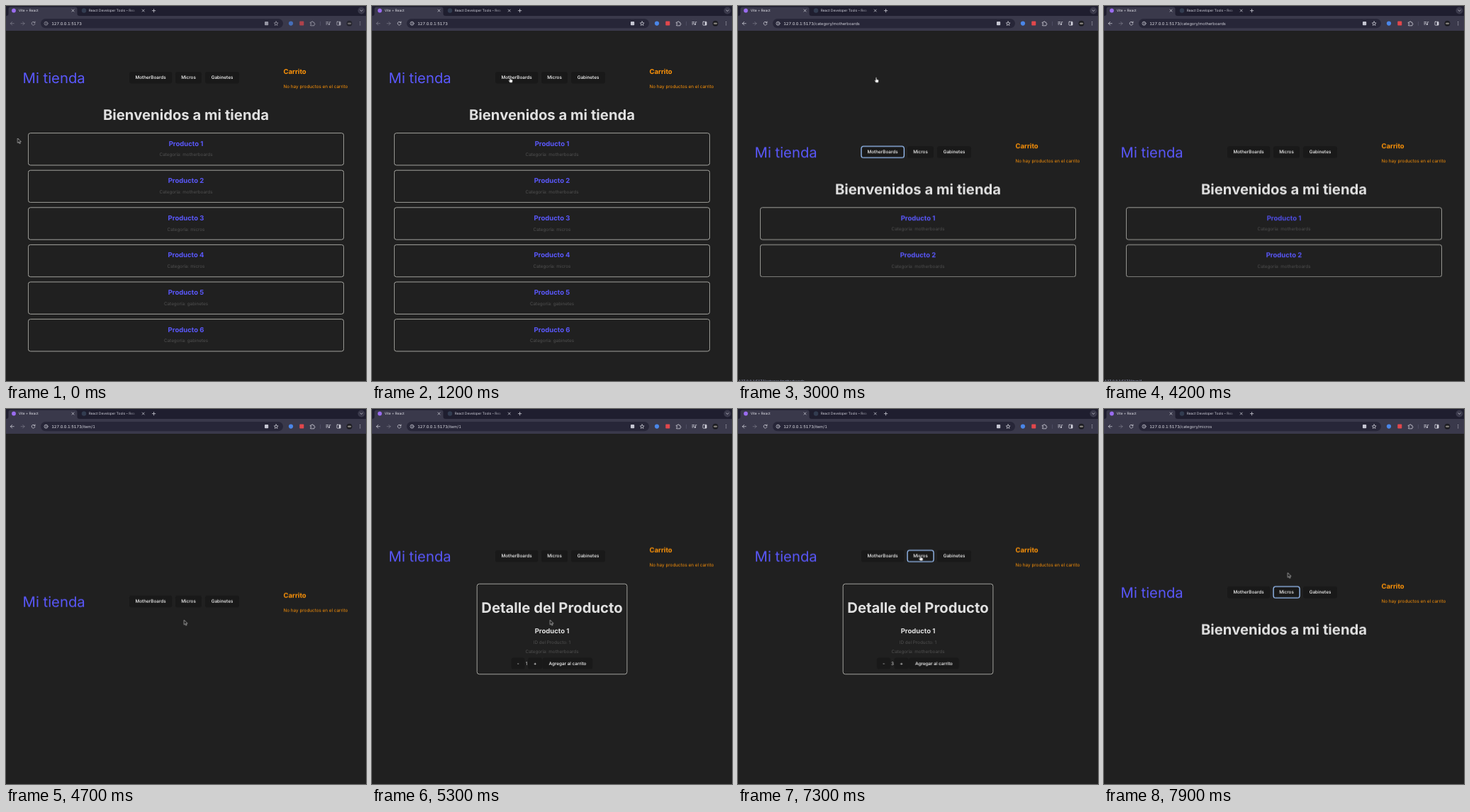
These frames come from a looping animation (508 by 530 pixels, 8 s). An HTML page:

```html
<!DOCTYPE html>
<html lang="es">
<head>
<meta charset="utf-8">
<title>Mi tienda</title>
<style>
html, body { margin: 0; width: 100%; height: 100%; overflow: hidden; background: #202020; }
svg { display: block; }
text { font-family: Inter, "Noto Sans", sans-serif; font-size: 6.35px; text-rendering: geometricPrecision; }
.mid { text-anchor: middle; }
.h1 { font-size: 20.3px; font-weight: 700; fill: #e0e0e0; }
.h2 { font-size: 9.525px; font-weight: 700; }
.brand { font-size: 20.3px; fill: #5a58fb; }
.link { fill: #5a58fb; }
.dim { fill: #505050; }
.cart { fill: #ff9408; }
.btn rect { fill: #191919; }
.btn text { fill: #fff; font-weight: 500; text-anchor: middle; }
.card { fill: none; stroke: #c4c4be; stroke-width: .8; }
.ring { fill: none; stroke: #9cc3fb; stroke-width: 1.3; }
.tab { font-size: 4.85px; fill: #e3e3ea; }
.url { font-size: 5.65px; fill: #e8e8ee; font-variant-numeric: tabular-nums; }
.url tspan { fill: #cfcfd8; }
.status { font-size: 4.85px; fill: #b4bae0; font-variant-numeric: tabular-nums; }
.line { fill: none; stroke: #d3d3dd; stroke-width: .75; stroke-linecap: round; stroke-linejoin: round; }

/* one loop is 8 s, so 1.25% is 100 ms */
.a { animation: 8s step-end infinite; }
.tools { animation-name: tools; }
.back { animation-name: back; }
.page { animation-name: page; }
.welcome { animation-name: welcome; }
.rest { animation-name: rest; }
.detail { animation-name: detail; }
.ring-mb { animation-name: ring-mb; }
.ring-mi { animation-name: ring-mi; }
.ring-plus { animation-name: ring-plus; }
.hover { animation-name: hover; }
.u-home { animation-name: u-home; }
.u-mb { animation-name: u-mb; }
.u-item { animation-name: u-item; }
.u-mi { animation-name: u-mi; }
.s-mb { animation-name: s-mb; }
.s-item { animation-name: s-item; }
.one { animation-name: one; }
.two { animation-name: two; }
.three { animation-name: three; }
.less { animation-name: less; }
.more { animation-name: more; }
.cursor { animation-name: cursor; }
.arrow { animation-name: arrow; }
.hand { animation-name: hand; }

@keyframes tools { 0% { opacity: .7 } 15%, 100% { opacity: 1 } }
@keyframes back { 0% { opacity: .45 } 23.75%, 100% { opacity: 1 } }
@keyframes page {
  0% { transform: translateY(0) }
  37.5% { transform: translateY(105.2px) }
  53.75% { transform: translateY(170.7px) }
  66.25% { transform: translateY(106.6px) }
  92.5%, 100% { transform: translateY(157.8px) }
}
@keyframes welcome { 0% { opacity: 1 } 53.75% { opacity: 0 } 92.5%, 100% { opacity: 1 } }
@keyframes rest { 0% { opacity: 1 } 37.5%, 100% { opacity: 0 } }
@keyframes detail { 0% { opacity: 0 } 66.25% { opacity: 1 } 92.5%, 100% { opacity: 0 } }
@keyframes ring-mb {
  0% { opacity: 0 } 18.75% { opacity: .4 } 20% { opacity: .75 } 21.25% { opacity: 1 } 51.25%, 100% { opacity: 0 }
}
@keyframes ring-mi { 0% { opacity: 0 } 90%, 100% { opacity: 1 } }
@keyframes ring-plus { 0% { opacity: 0 } 77.5% { opacity: 1 } 90%, 100% { opacity: 0 } }
@keyframes hover { 0% { fill: #5a58fb } 47.5% { fill: #504ee6 } 53.75%, 100% { fill: #5a58fb } }
@keyframes u-home { 0% { opacity: 1 } 23.75%, 100% { opacity: 0 } }
@keyframes u-mb { 0% { opacity: 0 } 23.75% { opacity: 1 } 53.75%, 100% { opacity: 0 } }
@keyframes u-item { 0% { opacity: 0 } 53.75% { opacity: 1 } 92.5%, 100% { opacity: 0 } }
@keyframes u-mi { 0% { opacity: 0 } 92.5%, 100% { opacity: 1 } }
@keyframes s-mb { 0% { opacity: 0 } 23.75% { opacity: .5 } 25% { opacity: 1 } 46.25%, 100% { opacity: 0 } }
@keyframes s-item { 0% { opacity: 0 } 48.75% { opacity: 1 } 57.5% { opacity: .5 } 58.75%, 100% { opacity: 0 } }
@keyframes one { 0% { opacity: 1 } 77.5%, 100% { opacity: 0 } }
@keyframes two { 0% { opacity: 0 } 77.5% { opacity: 1 } 81.25%, 100% { opacity: 0 } }
@keyframes three { 0% { opacity: 0 } 81.25%, 100% { opacity: 1 } }
@keyframes less { 0% { transform: none } 77.5%, 100% { transform: translateX(-.5px) } }
@keyframes more { 0% { transform: none } 77.5%, 100% { transform: translateX(.5px) } }
@keyframes cursor {
  0% { transform: translate(16.5px, 187px) }
  1.25% { transform: translate(18.7px, 186px) }
  3.75% { transform: translate(153.5px, 112.5px) }
  6.25% { transform: translate(165px, 110px); animation-timing-function: steps(3) }
  10% { transform: translate(206px, 102.5px); animation-timing-function: steps(2) }
  12.5% { transform: translate(195px, 100.7px) }
  41.25% { transform: translate(203px, 145px); animation-timing-function: steps(2) }
  43.75% { transform: translate(241.5px, 285px) }
  46.25% { transform: translate(245px, 290px); animation-timing-function: steps(3) }
  50% { transform: translate(251.3px, 298.3px) }
  70% { transform: translate(262px, 314px); animation-timing-function: steps(3) }
  73.75% { transform: translate(297px, 358px); animation-timing-function: steps(2) }
  76.25% { transform: translate(232.3px, 359.8px) }
  83.75% { transform: translate(236px, 338px); animation-timing-function: steps(4) }
  88.75% { transform: translate(257.5px, 207px) }
  98.75%, 100% { transform: translate(259.3px, 231.5px) }
}
@keyframes arrow {
  0% { opacity: 1 } 7.5% { opacity: 0 } 41.25% { opacity: 1 } 47.5% { opacity: 0 } 53.75% { opacity: 1 }
  73.75% { opacity: 0 } 83.75% { opacity: 1 } 87.5% { opacity: 0 } 98.75%, 100% { opacity: 1 }
}
@keyframes hand {
  0% { opacity: 0 } 7.5% { opacity: 1 } 41.25% { opacity: 0 } 47.5% { opacity: 1 } 52.5% { opacity: 0 }
  73.75% { opacity: 1 } 83.75% { opacity: 0 } 87.5% { opacity: 1 } 98.75%, 100% { opacity: 0 }
}
</style>
</head>
<body>
<svg width="508" height="530" viewBox="0 0 508 530">
  <defs>
    <linearGradient id="fade" gradientUnits="userSpaceOnUse" x1="172" x2="187" y1="0" y2="0">
      <stop stop-color="#d0d0da"/><stop offset="1" stop-color="#d0d0da" stop-opacity="0"/>
    </linearGradient>
  </defs>
  <rect width="508" height="530" fill="#202020"/>

  <!-- store page -->
  <g class="a page">
    <text class="brand" x="23.6" y="108.8">Mi tienda</text>
    <g class="btn">
      <rect x="174" y="93" width="60.4" height="16.4" rx="3.2"/><text x="204" y="103.3">MotherBoards</text>
      <rect x="239" y="93" width="37" height="16.4" rx="3.2"/><text x="257.5" y="103.3">Micros</text>
      <rect x="281" y="93" width="48" height="16.4" rx="3.2"/><text x="305" y="103.3">Gabinetes</text>
    </g>
    <rect class="ring a ring-mb" x="174" y="93.2" width="60.4" height="15.9" rx="3.2"/>
    <rect class="ring a ring-mi" x="239.1" y="93.2" width="37" height="15.9" rx="3.2"/>
    <text class="h2 cart" x="391.4" y="96.4">Carrito</text>
    <text class="cart" x="391.5" y="116">No hay productos en el carrito</text>
    <g class="a welcome">
      <text class="h1 mid" x="254" y="161">Bienvenidos a mi tienda</text>
      <g class="a rest" id="filtered"><g id="first"></g></g>
    </g>
  </g>

  <!-- product detail -->
  <g class="a detail">
    <rect class="card" x="148.2" y="247.2" width="211.7" height="127.6" rx="3.2"/>
    <text class="h1 mid" x="254" y="287.9">Detalle del Producto</text>
    <text class="h2 mid" x="254" y="317.4" fill="#e0e0e0">Producto 1</text>
    <text class="dim mid" x="254" y="331.9">ID del Producto: 1</text>
    <text class="dim mid" x="254" y="345.3">Categoría: motherboards</text>
    <g class="btn a less"><rect x="196.6" y="351.4" width="19" height="16.2" rx="3.2"/><text x="206.3" y="361.8">-</text></g>
    <g class="btn a more">
      <rect x="220" y="351.4" width="20.2" height="16.2" rx="3.2"/>
      <rect x="240.6" y="351.4" width="70.6" height="16.2" rx="3.2"/>
      <text x="230" y="361.8">+</text><text x="276" y="361.8">Agregar al carrito</text>
      <rect class="ring a ring-plus" style="fill:none" x="220.3" y="351.7" width="20" height="15.6" rx="3.2"/>
    </g>
    <g class="mid" fill="#d8d8d8">
      <text class="a one" x="218" y="361.8">1</text>
      <text class="a two" x="218" y="361.8">2</text>
      <text class="a three" x="218" y="361.8">3</text>
    </g>
  </g>

  <!-- browser frame -->
  <rect width="508" height="15" fill="#1f1e2f"/>
  <path d="M0 14Q3.5 14 3.5 11V4.5Q3.5 1.5 6.5 1.5H97.500Q100.500 1.500 100.500 4.500V11Q100.500 14 104 14H508V35H0Z" fill="#3a394b"/>
  <rect x="49" y="18" width="342" height="13.200" rx="6.600" fill="#272638"/>
  <circle cx="11" cy="6.500" r="2.900" fill="#9a6cf0"/>
  <circle cx="110" cy="6.500" r="3.200" fill="#323c50"/>
  <text class="tab" x="17.700" y="8.300">Vite + React</text>
  <text class="tab" x="116.700" y="8.300" style="fill:url(#fade)">React Developer Tools – Rea</text>
  <path class="line" d="M93 5l3 3m0-3l-3 3M192.200 5l3 3m0-3l-3 3M206.400 6.600h4.400m-2.200-2.200v4.400"/>
  <circle cx="501.500" cy="6.500" r="5" fill="#3a394b"/>
  <path class="line" d="M499.900 5.800l1.600 1.500 1.600-1.500"/>
  <path class="line a back" d="M11.200 24.700H6.300m2.300-2.300l-2.300 2.300 2.300 2.300"/>
  <path class="line" opacity=".4" d="M21.100 24.700h4.900m-2.300-2.300l2.300 2.300-2.300 2.300"/>

  <g class="a tools">
    <path class="line" d="M40.700 23.500a2.400 2.400 0 1 0 .2 1.800M41 22v1.700h-1.700"/>
    <circle class="line" cx="56.500" cy="24.700" r="2.500"/>
    <path class="line" d="M56.500 24.600v1.200m0-2.500v.1"/>
    <rect x="365" y="22" width="5.200" height="5.200" rx=".8" fill="#c5c6d2"/>
    <path class="line" d="M381.200 21.900l.8 1.900 2.100.2-1.600 1.400.5 2-1.800-1.100-1.800 1.100.5-2-1.600-1.400 2.100-.2z"/>
    <circle cx="402" cy="24.600" r="3.100" fill="#4a86e8"/>
    <rect x="414.300" y="21.600" width="6" height="6" rx=".8" fill="#e2474c"/>
    <path class="line" d="M429.700 23h1.600q0-1.300 1-1.300t1 1.300h1.500v1.500q1.200 0 1.200 1t-1.200 1v1.300h-5.100v-1.600q1.200-.1 1.200-.9t-1.200-.9z"/>
    <path class="line" d="M451.800 22.600h3m-3 1.700h3m-3 1.700h1.600m3.200-.2v-3.200h1.300"/>
    <circle cx="455.800" cy="26" r="1" fill="#d3d3dd"/>
    <rect class="line" x="466.900" y="22.200" width="5.200" height="5" rx=".6"/>
    <rect x="469.800" y="22.400" width="2.200" height="4.600" fill="#d3d3dd"/>
    <circle cx="484.500" cy="24.700" r="3.900" fill="#1d1d22"/>
    <ellipse cx="484.600" cy="24.700" rx="2.700" ry="1.200" fill="#85817c"/>
    <g fill="#d3d3dd">
      <circle cx="499.700" cy="22.600" r=".55"/><circle cx="499.700" cy="24.700" r=".55"/><circle cx="499.700" cy="26.800" r=".55"/>
    </g>
  </g>
  <path d="M443.500 21.800v6" stroke="#56556a" stroke-width=".7"/>
  <g class="url">
    <text class="url a u-home" x="64.200" y="26.700">127.0.0.1:5173</text>
    <text class="url a u-mb" x="64.200" y="26.700">127.0.0.1:5173<tspan>/category/motherboards</tspan></text>
    <text class="url a u-item" x="64.200" y="26.700">127.0.0.1:5173<tspan>/item/1</tspan></text>
    <text class="url a u-mi" x="64.200" y="26.700">127.0.0.1:5173<tspan>/category/micros</tspan></text>
  </g>
  <text class="status a s-mb" x="1" y="531.800">127.0.0.1:5173/category/motherboards</text>
  <text class="status a s-item" x="1" y="531.800">127.0.0.1:5173/item/1</text>

  <g class="a cursor">
    <path class="a arrow" d="M0 0V6.500L1.500 5.200 2.600 7.600 3.700 7.100 2.600 4.800H4.700Z" fill="#0a0a0a" stroke="#f2f2f2" stroke-width=".6" stroke-linejoin="round"/>
    <path class="a hand" d="M-.7.700a.7.700 0 0 1 1.400 0V3l2.100.500q.8.300.7 1.200L3 7.400H-.4L-2.300 4.700q-.4-.9.600-.8l1 .8Z" fill="#fff" stroke="#111" stroke-width=".4"/>
  </g>
</svg>
<script>
const filtered = document.getElementById('filtered');
const first = document.getElementById('first');
const kinds = ['motherboards', 'micros', 'gabinetes'];

function card(i) {
  const y = 179.6 + 52.6 * i;
  return `<rect class="card" x="31.4" y="${y}" width="445.2" height="45.4" rx="3.2"/>
    <text class="h2 mid link${i ? '' : ' a hover'}" x="254" y="${y + 17.9}">Producto ${i + 1}</text>
    <text class="dim mid" x="254" y="${y + 32.8}">Categoría: ${kinds[i >> 1]}</text>`;
}

// The first two products outlive the rest, but not the filtered list.
first.innerHTML = card(0) + card(1);
filtered.before(first);
filtered.innerHTML = [2, 3, 4, 5].map(card).join('');
first.setAttribute('class', 'a pair');
const style = document.createElement('style');
style.textContent = '.pair { animation-name: pair } @keyframes pair { 0% { opacity: 1 } 53.75%, 100% { opacity: 0 } }';
document.head.append(style);
</script>
</body>
</html>
```
